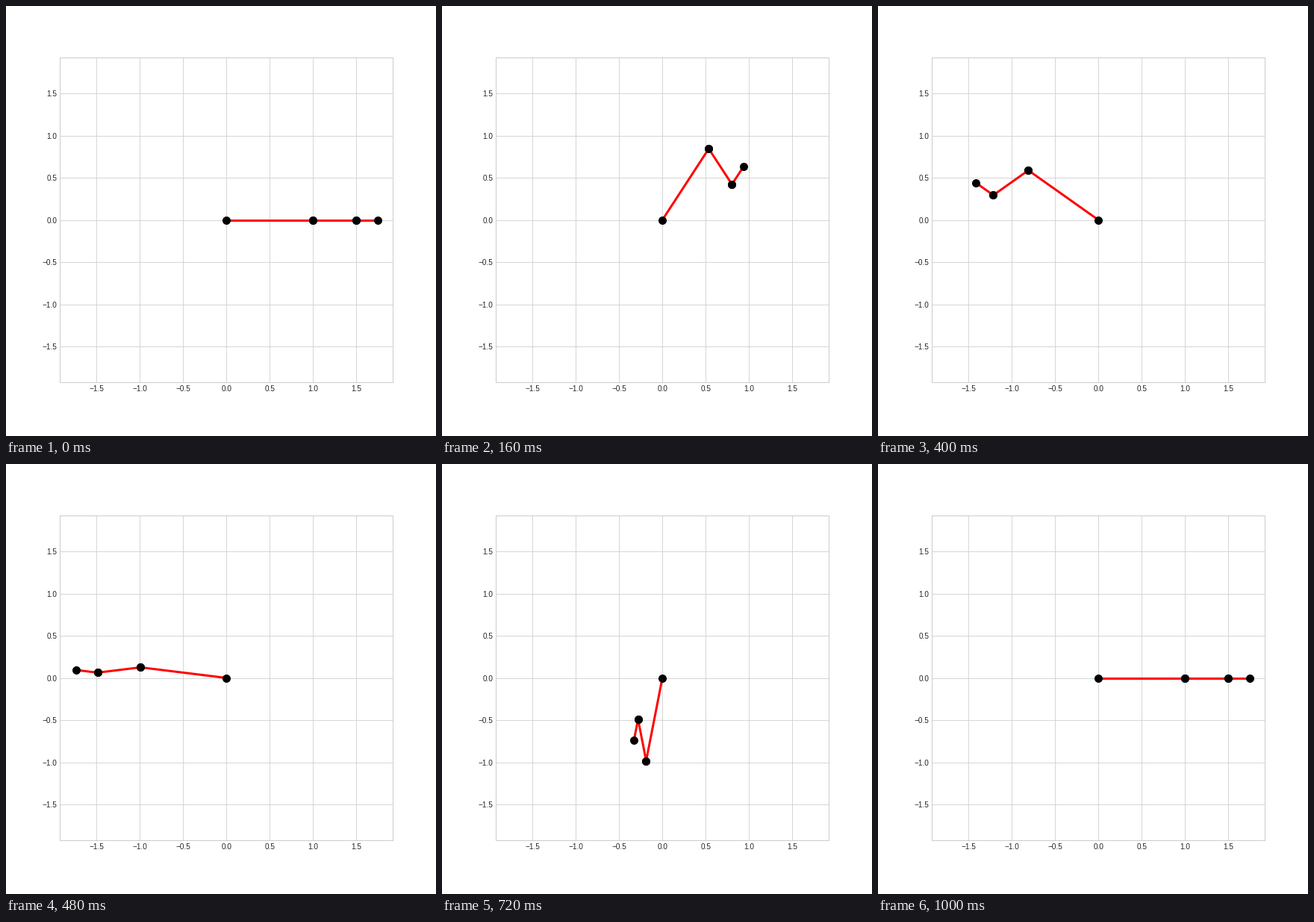
Animation of 576 by 576 pixels, one loop 1020 ms. Source, as a matplotlib script:

```python
import numpy as np
import matplotlib.pyplot as plt
from matplotlib.animation import FuncAnimation

FRAMES = 51
LENGTHS = np.array([1.0, 0.5, 0.25])
SIGNS = np.array([1, -1, 1])  # each link folds back against the one before
LIMIT = 1.1 * LENGTHS.sum()

plt.style.use("seaborn-v0_8-whitegrid")
plt.rcParams.update({"font.family": "Liberation Sans", "font.size": 10})

fig, ax = plt.subplots(figsize=(8, 8), dpi=72)
fig.subplots_adjust(left=0.125, right=0.9, bottom=0.125, top=0.88)
ax.set(xlim=(-LIMIT, LIMIT), ylim=(-LIMIT, LIMIT))
ticks = np.arange(-1.5, 1.6, 0.5)
ax.set_xticks(ticks)
ax.set_yticks(ticks)

links = [
    ax.plot([], [], "o-", color="red", lw=3, ms=10, mfc="black", mec="black")[0]
    for _ in LENGTHS
]


def joints(theta):
    """Joint positions of the arm, starting at the fixed origin."""
    x = np.cumsum(LENGTHS * np.cos(SIGNS * theta))
    y = np.cumsum(LENGTHS * np.sin(SIGNS * theta))
    return np.append(0, x), np.append(0, y)


def update(i):
    x, y = joints(2 * np.pi * i / (FRAMES - 1))
    for k, link in enumerate(links):
        link.set_data(x[k:k + 2], y[k:k + 2])
    return links


anim = FuncAnimation(fig, update, frames=FRAMES, interval=20, repeat=True)
plt.show()
```
